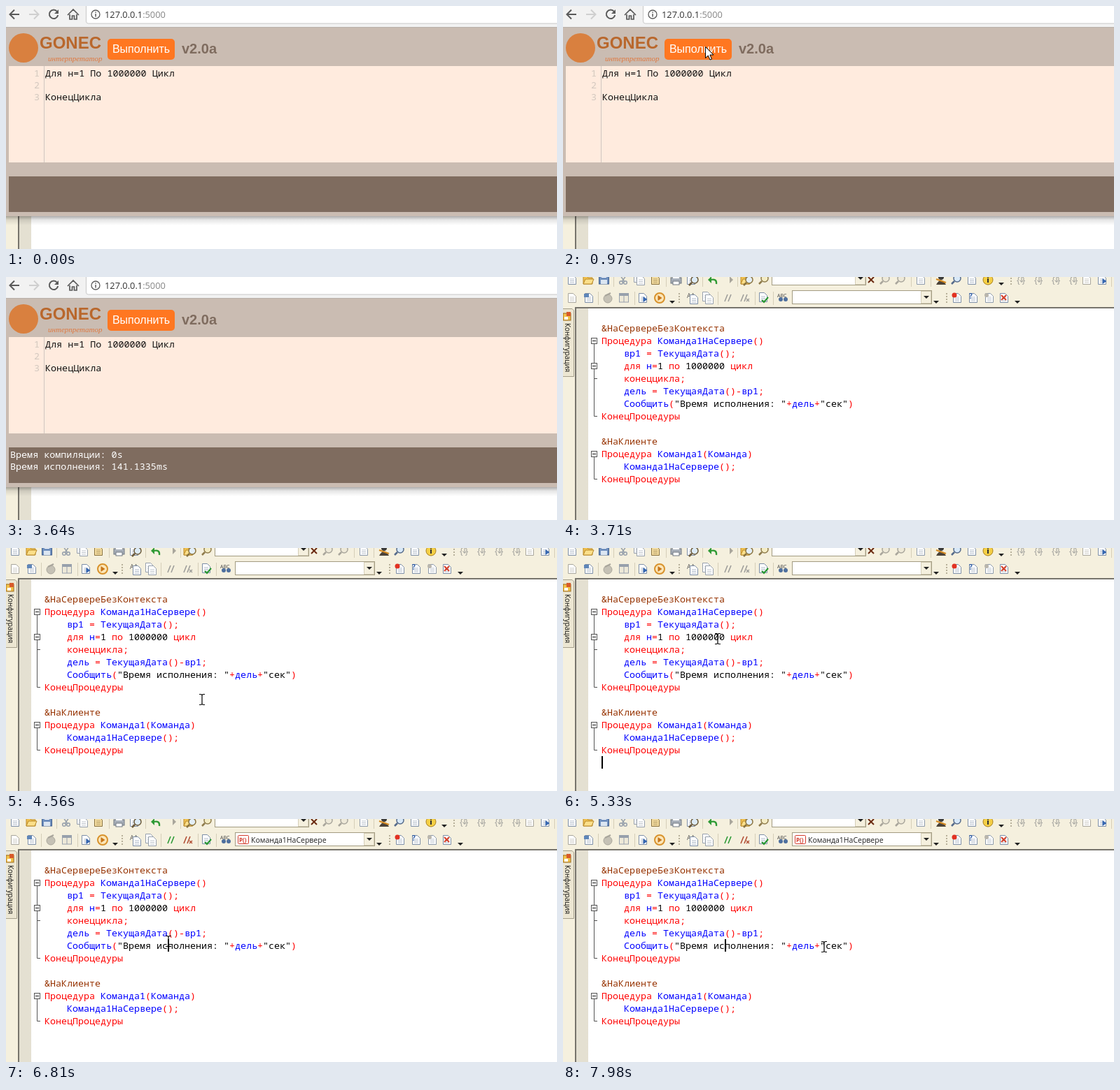
An HTML page that plays this animation: 787x348 px, repeating every 8 s.

```html
<!DOCTYPE html>
<html lang="ru">
<head>
<meta charset="utf-8">
<title>Цикл</title>
<style>
html, body { margin: 0; width: 100%; height: 100%; overflow: hidden; background: #fff; }
svg { display: block; width: 787px; height: 348px; }
text { white-space: pre; }
.mono { font-family: "Noto Sans Mono", monospace; font-weight: 500; }
.ui { font-family: "Open Sans", sans-serif; }
.arial { font-family: "Liberation Sans", sans-serif; }
</style>
</head>
<body>
<svg id="stage" viewBox="0 0 787 348" xmlns="http://www.w3.org/2000/svg"></svg>
<script>
const LOOP = 8000;
const stage = document.getElementById('stage');
const CREAM = '#f5f0de', EDGE = '#77746c';

const rect = (x, y, w, h, fill, more = '') =>
  `<rect x="${x}" y="${y}" width="${w}" height="${h}" fill="${fill}" ${more}/>`;
const line = (d, color, w = 1, more = '') =>
  `<path d="${d}" fill="none" stroke="${color}" stroke-width="${w}" ${more}/>`;
const shape = (d, fill, more = '') => `<path d="${d}" fill="${fill}" ${more}/>`;
const dot = (x, y, r, fill, more = '') => `<circle cx="${x}" cy="${y}" r="${r}" fill="${fill}" ${more}/>`;
const text = (x, y, size, fill, str, cls, more = '') =>
  `<text x="${x}" y="${y}" font-size="${size}" fill="${fill}" class="${cls}" ${more}>${str}</text>`;
const group = (id, body) => `<g id="${id}">${body}</g>`;

const defs = `<defs>
  <pattern id="hatch" width="2" height="2" patternUnits="userSpaceOnUse">
    ${rect(0, 0, 2, 2, '#f8f5e9')}${rect(0, 0, 1, 1, '#d0cbba')}${rect(1, 1, 1, 1, '#d0cbba')}
  </pattern>
  <linearGradient id="shade" x1="0" y1="0" x2="0" y2="1">
    <stop offset="0" stop-color="#000" stop-opacity=".32"/>
    <stop offset=".4" stop-color="#000" stop-opacity=".1"/>
    <stop offset="1" stop-color="#000" stop-opacity="0"/>
  </linearGradient>
</defs>`;

// Left margin of the editor, also seen below the browser.
const margin = y => rect(17, y, 2, 348 - y, EDGE) + rect(19, y, 17, 348 - y, 'url(#hatch)');

// ---------- browser window ----------
function browser() {
  const ink = '#5a5a5a', size = 13.4;
  const code = (x, y, str, fill) => text(x, y, size, fill, str, 'mono');
  return [
    rect(0, 0, 787, 31, '#f2f2f2'),
    rect(114.5, -6, 700, 31, '#fff', 'rx="3" stroke="#c8c8c8"'),
    line('M19 12H6M12 5.5L5.5 12L12 18.5', ink, 2),
    line('M33 12H46M40 5.5L46.5 12L40 18.5', '#cfcfcf', 2),
    line('M73 8A6.2 6.2 0 1 0 74.2 13', ink, 2),
    shape('M75 5V11H69Z', ink),
    line('M88 13L96 5L104 13M91 12V19H94.5V14H97.5V19H101V12', ink, 1.7),
    dot(128, 12, 6, 'none', 'stroke="#5a5a5a" stroke-width="1.3"'),
    rect(127.3, 11, 1.5, 4.5, ink), rect(127.3, 8.3, 1.5, 1.5, ink),
    text(141, 17, 12.8, '#333', '127.0.0.1<tspan fill="#858585">:5000</tspan>', 'ui'),
    rect(0, 30, 787, 272, '#cabcb2'),
    rect(0, 30, 787, 1, '#b9b0aa'),
    dot(25, 60, 21, '#d9803f'),
    text(48, 61, 24, '#b9672c', 'GONEC', 'arial', 'font-weight="bold"'),
    text(60, 79, 11, '#df7a42', 'интерпретатор', '', 'font-family="Liberation Serif, serif" font-style="italic"'),
    rect(145, 47, 96, 30, '#ff7721', 'rx="5" id="button"'),
    text(193, 67, 16, '#fff', 'Выполнить', 'arial', 'text-anchor="middle"'),
    text(251, 68, 20, '#7f6c5f', 'v2.0a', 'arial', 'font-weight="bold"'),
    rect(4, 86, 783, 138, '#ffebde'),
    rect(54, 86, 1, 138, '#cfc6c0'),
    [1, 2, 3].map(n => code(40, 84 + 17 * n, n, '#d3c8bf')).join(''),
    code(56, 101, 'Для н=1 По 1000000 Цикл', '#111'),
    code(56, 135, 'КонецЦикла', '#111'),
    rect(4, 244, 783, 51, '#7f6c5f'),
    group('output', code(6, 259, 'Время компиляции: 0s', '#fff') + code(6, 276, 'Время исполнения: 141.1335ms', '#fff')),
    rect(0, 301, 787, 47, '#fff'),
    rect(0, 301, 17, 47, CREAM),
    margin(301),
    rect(0, 301, 787, 13, 'url(#shade)')
  ].join('');
}

// ---------- toolbar icons ----------
const page = (x, y, edge = '#7d8ea6', fill = '#fff') =>
  shape(`M${x - 5.5} ${y - 6.5}h7l4 4v9h-11z`, fill, `stroke="${edge}"`) +
  line(`M${x - 3} ${y - 1}h6m-6 2.5h6m-6 2.5h6`, edge, 1, 'opacity=".6"');
const sheets = (x, y, edge) => page(x - 2, y - 2, edge) + page(x + 2, y + 2, edge);
const drop = (x, y) => shape(`M${x - 4} ${y - 2}h8l-4 4z`, '#222');
const lens = (x, y, edge, fill) =>
  dot(x + 1, y - 2, 5, fill, `stroke="${edge}" stroke-width="1.5"`) + line(`M${x - 3} ${y + 2}l-4 4`, edge, 2.5);
const play = (x, y, fill) => shape(`M${x - 2.5} ${y - 4}l6 4l-6 4z`, fill);
const folder = (x, y) => shape(`M${x - 7} ${y + 6}v-11h5l2 2h6v9z`, '#f0c050', 'stroke="#b98a2a"') +
  shape(`M${x - 7} ${y + 6}l3-7h12l-3 7z`, '#fbdf8a', 'stroke="#b98a2a"');
const grip = (x, y) => [0, 4, 8, 12].map(k => rect(x, y - 7 + k, 2, 2, '#b7b09a')).join('');
const sep = (x, y) => rect(x, y - 9, 1, 19, '#d5ceb8');
const braces = (x, y) => text(x - 7, y + 4, 12, '#9b9b98', '{ }', 'ui') + line(`M${x} ${y - 6}v8m-2.5-2.5l2.5 3l2.5-3`, '#9b9b98');
const slashes = (x, fill) => line(`M${x - 4} 35l4-10M${x + 1} 35l4-10`, fill, 1.5);
const comments = (add, cut) => slashes(235, add) + slashes(258, cut) + line('M262 31l4 4m0-4l-4 4', cut, 1.3);
const combo = (x, y, w) => rect(x + .5, y + .5, w, 19, '#fff', 'stroke="#a39c82"') +
  rect(x + w - 14.5, y + 1.5, 14, 17, CREAM, 'stroke="#d5ceb8"') + drop(x + w - 7, y + 10);
const turn = (x, dir, fill) =>
  line(`M${x + 6 * dir} 10q${dir}-8-${dir < 0 ? -8 : 8} -6`.replace(`-${dir < 0 ? -8 : 8} -6`, `${-8 * dir}-6`), fill, 2.3) +
  shape(`M${x - 6 * dir} 4l${5 * dir}-5v10z`, fill);

function clipIcons(edge, blade) {
  return line('M82 -2L88 7M90 -2L84 7', edge, 1.5) +
    dot(83, 8, 2.3, 'none', `stroke="${blade}" stroke-width="1.5"`) +
    dot(89, 8, 2.3, 'none', `stroke="${blade}" stroke-width="1.5"`) +
    sheets(109, 3, edge);
}

function toolbars() {
  const grey = '#a9a69c', steel = '#97a0ac';
  const top = [
    page(13, 4), folder(36, 4),
    rect(51.5, -3, 14, 13, '#6f8fbd', 'stroke="#3f5f8f"'), rect(54, 4, 9, 6, '#dce6f2'), rect(55, -3, 7, 4, '#fff'),
    sep(72, 4),
    group('clipOff', clipIcons(steel, steel)),
    group('clipOn', clipIcons('#3f5f9f', '#c0392b')),
    page(132, 4, '#8a7340', '#f3dca0'), sep(147, 4),
    rect(154, 1, 15, 8, '#a9b0ba', 'stroke="#6f7680"'), rect(157, -4, 9, 6, '#fff'), rect(157, 6, 9, 5, '#fff', 'stroke="#6f7680"'),
    page(183, 4), lens(187, 6, '#6b5a3a', '#dceaf6'), sep(199, 4),
    turn(213, 1, '#2f9a35'), turn(237, -1, grey),
    sep(249, 4), folder(261, 4), lens(265, 6, '#8a7440', '#e3eef7'), lens(287, 4, '#8f7c4c', '#f4ecc4'),
    combo(298, -8, 134), line('M436 0l8 8m0-8l-8 8', '#6b2a12', 2),
    lens(460, 4, grey, '#eee9d8'), lens(482, 4, grey, '#eee9d8'),
    sep(497, 4), page(511, 4, '#8d9aab'), sep(525, 4),
    dot(540, 0, 4, '#3b3b3b'), shape('M533 11q7-13 14 0z', '#4c4338'), line('M533 3l14 5', '#d58a20', 2),
    lens(562, 4, '#566b8c', '#d7e8f8'), page(584, 4),
    dot(607, 4, 7, '#f6cf45', 'stroke="#a8801f"'), rect(606, 2, 2, 6, '#333'), rect(606, -1, 2, 2, '#333'),
    drop(626, 10), grip(639, 4),
    [655, 680, 705, 730].map(x => braces(x, 5)).join(''),
    page(748, 4, grey), page(770, 4), play(773, 6, '#3566b0'), sep(783, 4)
  ];
  const low = [
    page(13, 30, grey), page(37, 30), rect(30, 24, 7, 5, '#5f86b8'), sep(50, 30),
    dot(64, 31, 6, '#c5c1b5', 'stroke="#a9a69c"'), line('M60 27l8-4', grey, 2),
    rect(80.5, 24, 13, 12, '#eee9d8', 'stroke="#97a0ac"'), rect(80, 23, 14, 4, steel), line('M87 27v9', steel), sep(102, 30),
    page(114, 30), play(117, 32, '#3566b0'),
    dot(138, 30, 7, '#fbe6b8', 'stroke="#d8922c" stroke-width="2"'), play(138, 30, '#c87518'),
    drop(156, 36), grip(165, 30),
    text(177, 30, 9, '#555', 'AA', 'ui'), page(187, 32), sheets(207, 30, steel),
    group('slashOff', comments('#9b9b98', '#9b9b98')),
    group('slashOn', comments('#25962f', '#b04a30')),
    sep(221, 30), sep(274, 30),
    page(286, 29), line('M284 33l3 3l6-7', '#23962c', 2), sep(300, 30),
    text(306, 29, 7, '#444', 'ABC', 'ui'), dot(311, 32, 3, '#4e6f9e'), dot(318, 32, 3, '#4e6f9e'),
    combo(327, 19, 199),
    group('method', rect(331.5, 23.5, 15, 12, '#fff', 'stroke="#d33b2c" rx="1"') +
      text(333, 32.5, 8, '#d33b2c', 'P()', 'ui', 'font-weight="bold"') +
      text(350, 34, 10.5, '#222', 'Команда1НаСервере', 'ui')),
    drop(533, 36), grip(547, 30),
    page(563, 30), dot(559, 26, 3.5, '#e23222'),
    page(586, 30), text(580, 31, 10, '#2f5ea8', '?', 'ui', 'font-weight="bold"'),
    page(609, 30, '#8d9aab'), dot(605, 26, 3, '#b9b6ad'),
    page(630, 30), line('M626 26l7 7m0-7l-7 7', '#d6402a', 2), drop(649, 36)
  ];
  return top.join('') + low.join('');
}

// ---------- code editor ----------
const CODE = [
  '&НаСервереБезКонтекста',
  'Процедура Команда1НаСервере()',
  '    вр1 = ТекущаяДата();',
  '    для н=1 по 1000000 цикл',
  '    конеццикла;',
  '    дель = ТекущаяДата()-вр1;',
  '    Сообщить("Время исполнения: "+дель+"сек")',
  'КонецПроцедуры',
  '',
  '&НаКлиенте',
  'Процедура Команда1(Команда)',
  '    Команда1НаСервере();',
  'КонецПроцедуры'
];
const KEYWORD = /^(процедура|конецпроцедуры|для|по|цикл|конеццикла)$/i;

function tint(token) {
  if (token[0] === '&') return '#963200';
  if (/^["\d]/.test(token)) return '#000';
  if (/^[а-я]/i.test(token) && !KEYWORD.test(token)) return '#0000ff';
  return '#ff0000';
}
const codeLine = (str, i) => {
  const spans = (str.match(/&[а-я]+|"[^"]*"|[а-я][а-я\d]*|\d+|[^а-я\d"&]+/gi) || [])
    .map(k => `<tspan fill="${tint(k)}">${k.replace('&', '&amp;')}</tspan>`).join('');
  return text(55, 78 + 18 * i, 13.333, '#000', spans, 'mono');
};
const fold = y => rect(40.5, y - 4, 8, 8, '#fff', 'stroke="#555"') + line(`M42 ${y}h5`, '#222');

function editor() {
  return [
    rect(0, 0, 787, 348, CREAM),
    rect(18, 44, 769, 304, '#fff'),
    margin(44),
    rect(17, 43, 770, 2, EDGE),
    shape('M-1 45.5H13L15.5 48V142.5H-1Z', '#ece6d2', 'stroke="#a59f8c"'),
    rect(0, 52, 11, 10, '#f2c14b', 'stroke="#9a6a1c"'), rect(5, 50, 6, 6, '#d85a2a'), rect(2, 57, 5, 4, '#fff'),
    text(0, 0, 9.9, '#111', 'Конфигурация', 'ui', 'transform="translate(2.5 66) rotate(90)"'),
    toolbars(),
    line('M44.5 91V199.5H49M44.5 145.5H49M44.5 253V289.5H49', '#555'),
    [91.5, 127.5, 253.5].map(fold).join(''),
    CODE.map(codeLine).join(''),
    group('selection', rect(175, 119, 56, 18, '#3399ff') + text(175, 132, 13.333, '#fff', '1000000', 'mono')),
    rect(0, 0, 2, 18, '#000', 'id="caret"')
  ].join('');
}

stage.innerHTML = defs + group('browser', browser()) + group('editor', editor()) +
  group('arrow', shape('M.5 .5V16.5L4.3 13L7 19L9.5 18L6.9 12H12Z', '#fff', 'stroke="#000"')) +
  group('beam', line('M-4 -7.5H-1.5L0 -6.5L1.5 -7.5H4M0 -6.5V6.5M-4 7.5H-1.5L0 6.5L1.5 7.5H4', '#000', 1.2));

const el = {};
stage.querySelectorAll('[id]').forEach(n => el[n.id] = n);
const show = (id, on) => { el[id].style.display = on ? '' : 'none'; };

// Each track: pointer type, sampling step, end time, keys of [time, x, y].
const TRACKS = [
  ['arrow', 75, 2540, [[70, 656, 326], [250, 500, 232], [480, 325, 128], [670, 230, 78], [820, 206, 66], [970, 203, 58], [2300, 203, 58], [2380, 228, 102], [2460, 299, 226]]],
  ['beam', 77, 7130, [[4250, 341, 325], [4500, 292, 235], [4760, 240, 155], [5020, 223, 128], [5290, 221, 130], [5400, 221, 130], [5560, 224, 125], [5880, 224, 125], [6180, 229, 152], [6490, 232, 175]]],
  ['beam', 77, LOOP, [[7130, 232, 175], [7350, 199, 191], [7600, 265, 187], [7900, 357, 183], [7975, 373, 183]]]
];

function place(keys, t) {
  const i = keys.findIndex(k => k[0] > t);
  if (i < 0) return keys[keys.length - 1].slice(1);
  const [a, b] = [keys[i - 1], keys[i]];
  const f = (t - a[0]) / (b[0] - a[0]);
  return [1, 2].map(n => Math.round(a[n] + (b[n] - a[n]) * f));
}

function pointer(t) {
  show('arrow', false);
  show('beam', false);
  for (const [id, step, end, keys] of TRACKS) {
    const start = keys[0][0];
    if (t < start || t >= end) continue;
    const [x, y] = place(keys, start + Math.floor((t - start) / step) * step);
    el[id].setAttribute('transform', `translate(${x} ${y})`);
    show(id, true);
  }
}

// Caret spots: [since, x, y]; blinking restarts at each spot.
const SPOTS = [[3790, 55, 298], [5560, 231, 118], [6810, 231, 172]];

function caret(t) {
  const spot = SPOTS.filter(s => s[0] <= t).pop();
  show('caret', spot && Math.floor((t - spot[0]) / 530) % 2 === 0);
  if (!spot) return;
  el.caret.setAttribute('x', spot[1]);
  el.caret.setAttribute('y', spot[2]);
}

function draw(t) {
  const selected = t >= 5880 && t < 6810, inMethod = t >= 5710;
  show('browser', t < 3710);
  show('editor', t >= 3710);
  show('output', t >= 1430);
  el.button.setAttribute('fill', t >= 1220 && t < 1290 ? '#e8640f' : '#ff7721');
  show('method', inMethod);
  show('slashOn', inMethod);
  show('slashOff', !inMethod);
  show('selection', selected);
  show('clipOn', selected);
  show('clipOff', !selected);
  caret(t);
  pointer(t);
}

function tick() {
  draw(performance.now() % LOOP);
  requestAnimationFrame(tick);
}
tick();
</script>
</body>
</html>
```
